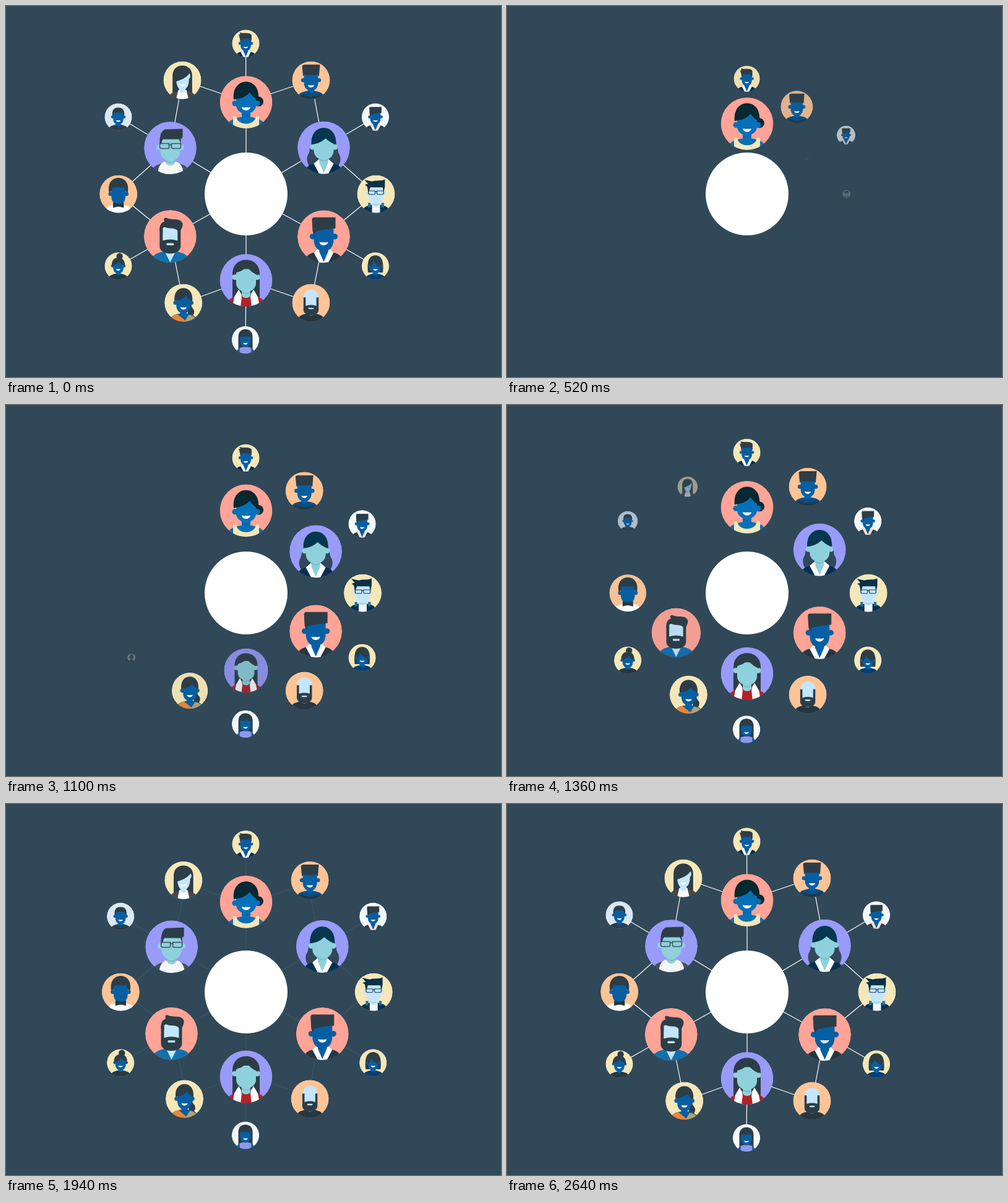
An HTML page that plays this animation: 800x600 px, repeating every 5.02 s.

```html
<!DOCTYPE html>
<html lang="en">
<head>
<meta charset="utf-8">
<title>Community network</title>
<style>
html, body { margin: 0; width: 100%; height: 100%; overflow: hidden; background: #314858; }
svg { display: block; width: 100vw; height: 100vh; }
</style>
</head>
<body>
<svg id="stage" viewBox="0 0 800 600">
  <defs><clipPath id="disc"><circle r="42.5"/></clipPath></defs>
  <g id="links" stroke="#fff" stroke-width="1.2"></g>
  <g id="people"></g>
  <circle cx="388" cy="304" r="67" fill="#fff"/>
</svg>
<script>
const LOOP = 5020, STEP = 20, POP = 300, CX = 388, CY = 304;
const RED = '#ffa496', VIOLET = '#989bf8', ORANGE = '#ffc496', CREAM = '#f5e7b8',
      WHITE = '#f3f8fb', PALE = '#dbe8f3';
const BLUE = '#0670b8', DEEP = '#075fa3', TEAL = '#8ed1dc', LIGHT = '#c4e6fd',
      HAIR = '#2d3d47', NAVY = '#062f50', INK = '#263741';

// Portrait parts, drawn in a disc of radius 42.5 around 0,0
const p = (fill, d) => `<path fill="${fill}" d="${d}"/>`;
const dot = (fill, x, y, r) => `<circle fill="${fill}" cx="${x}" cy="${y}" r="${r}"/>`;
const body = fill => p(fill, 'M-30 43C-30 29 -22 27 -8 24H8C22 27 30 29 30 43Z');
const neck = fill => p(fill, 'M-7 12H7V24C6 30 -6 30 -7 24Z');
const ears = (fill, y = 0) => dot(fill, -18, y, 4.6) + dot(fill, 18, y, 4.6);
const face = (fill, chin = 24) =>
  p(fill, `M-16 -18H16V5C16 ${chin - 6} 8 ${chin} 0 ${chin}S-16 ${chin - 6} -16 5Z`);
const smile = (y = 9) => p('#fff', `M-7 ${y}Q0 ${y + 1} 7 ${y}C6 ${y + 7} -6 ${y + 7} -7 ${y}Z`);
const head = (skin, chin, y) => neck(skin) + ears(skin, y) + face(skin, chin);
const shade = (skin, y = 21) => p(skin, `M-7 ${y}Q0 ${y + 5} 7 ${y}V${y + 2}Q0 ${y + 7} -7 ${y + 2}Z`);
const collar = (skin, shirt = '#fff') =>
  p(shirt, 'M-16 26L-8 19H8L16 26L7 43H-7Z') + p(skin, 'M-7 18H7V25L0 41L-7 25Z');
const flatTop = fill => p(fill, 'M-18 -9L-19 -27Q-19 -31 -15 -31H19V-13C8 -12 -4 -11 -12 -8L-16 -2Z');
const glasses = c => `<path fill="none" stroke="${c}" stroke-width="1.6"
  d="M-17 -7H-2V-1Q-2 1 -4 1H-14Q-17 1 -17 -2ZM2 -7H17V-2Q17 1 14 1H4Q2 1 2 -1ZM-2 -5H2"/>`;
const beard = p(HAIR, 'M-17 -12H-12V7Q0 3 12 7V-12H17V16C17 32 -17 32 -17 16Z')
  + `<rect x="-6" y="11" width="12" height="3.4" rx="1.5" fill="${LIGHT}"/>`;
const crown = fill => p(fill, 'M-20 -4C-22 -23 -12 -33 0 -33S22 -23 20 -4C12 -7 8 -12 6 -16C0 -9 -8 -6 -16 -5Z');
const longHair = fill => p(fill, 'M-22 42V-10C-22 -25 -12 -33 0 -33S22 -25 22 -10V42Z');

const big = [
  [388, 155.5, RED, 233, body(BLUE) + p(CREAM, 'M-21 43V23H-16C-14 39 14 39 16 23H21V43Z')
    + dot('#082832', 20, -1, 8) + head(BLUE, 19, 2) + shade('#0766a8', 18) + smile(8) + crown('#082832')],
  [513.5, 229, VIOLET, 507, p('#33475a', 'M-18 -8C-25 -1 -21 5 -25 11S-27 29 -19 34L-8 30V-8ZM18 -8C25 -1 21 5 25 11S27 29 19 34L8 30V-8Z')
    + body(NAVY) + collar(TEAL) + head(TEAL, 20, -1) + shade('#77bccb', 18)
    + p('#05384f', 'M-20 -5C-21 -23 -11 -32 0 -32S21 -23 20 -5C15 -6 8 -10 3 -15C-2 -10 -9 -6 -20 -5Z')],
  [513.5, 372.8, RED, 652, body(INK) + collar(DEEP) + head(DEEP) + smile() + flatTop(HAIR)],
  [388, 443.5, VIOLET, 920, longHair(HAIR) + body('#b42129')
    + p('#fff', 'M-12 15L-19 27L-22 43H-5L-8 22ZM12 15L19 27L22 43H5L8 22Z')
    + p('#b42129', 'M-7 27L0 31L7 27L9 43H-9Z') + head(TEAL, 19, -5) + shade('#77bccb', 18)
    + p(HAIR, 'M-19 -8C-19 -26 -8 -30 0 -29S19 -26 19 -8C13 -11 5 -15 1 -24C-3 -15 -12 -14 -16 -12Z')],
  [265.3, 372.5, RED, 1135, body('#1470ad') + p(LIGHT, 'M-9 24H9L0 42Z') + face(LIGHT, 20) + beard
    + p(HAIR, 'M-17 -8C-18 -19 -13 -23 -9 -24C-11 -27 -10 -30 -7 -30C4 -25 16 -31 20 -21C21 -16 18 -12 16 -8H13C10 -12 6 -13 0 -13C-6 -13 -10 -17 -12 -13V-6Z')],
  [265.5, 229.5, VIOLET, 1366, body('#43515d') + p('#f4f8fb', 'M-20 43C-20 31 -16 25 -9 22C-4 28 4 28 9 22C17 25 21 31 21 43Z')
    + head(TEAL, 21, -1) + shade('#77bccb', 20)
    + p(HAIR, 'M-17 -5C-18 -20 -14 -29 -8 -30L20 -31V-19Q20 -15 17 -15V-7L14 -14H-11Q-14 -13 -14 -7Z') + glasses('#43515d')]
];

const mid = [
  [493, 120, ORANGE, 335, body('#064f87') + p(INK, 'M-32 43C-29 32 -20 31 -12 34Q0 40 12 34C20 31 29 32 32 43Z')
    + head(DEEP) + smile(11) + p(HAIR, 'M-18 -9L-20 -31Q-20 -34 -15 -35H20L18 -9L14 -13C7 -11 -7 -11 -14 -13Z')],
  [598, 304, CREAM, 485, body(NAVY) + p(WHITE, 'M-9 24H9V43H-9Z') + p('#1673ad', 'M-18 20H-12V30H-18ZM12 20H18V30H12Z')
    + head(LIGHT, 23, -1) + shade('#8fcbea')
    + p('#0a3147', 'M-17 -2L-20 -17L-25 -21L-18 -23L-26 -32L-9 -28C0 -32 12 -28 20 -33V-17L17 -2L15 -15H-13Z') + glasses('#173c52')],
  [493, 480, ORANGE, 785, body(INK) + neck(LIGHT) + p(LIGHT, 'M-17 10V-10C-17 -23 -9 -29 0 -29S17 -23 17 -10V10Z') + beard],
  [286.7, 480, CREAM, 863, p(HAIR, 'M8 -18C27 -8 14 5 20 11S26 24 18 32L10 28Z') + body(DEEP)
    + p('#ed8535', 'M-32 43C-29 31 -22 28 -14 25L8 43Z') + p('#b7a06b', 'M2 43L12 27C23 29 29 33 31 43Z')
    + head(DEEP) + smile(10) + crown(HAIR)],
  [181.7, 304, ORANGE, 1105, body('#fff') + head(DEEP) + p(HAIR, 'M-21 -3C-25 -24 -14 -36 0 -36S25 -24 21 -3L16 -6L13 -15H-13L-16 -6Z')
    + p(INK, 'M-12 19L0 22L12 19V31L0 28L-12 31Z')],
  [285, 120, CREAM, 1265, longHair(HAIR) + body('#4a4744') + p('#fff', 'M-9 22H9L14 43H-14Z')
    + neck(LIGHT) + p(LIGHT, 'M-14 1C-2 -1 9 -7 13 -17C18 -16 20 -7 15 -3C15 13 9 22 0 22S-12 14 -14 1Z')
    + smile(9) + p(HAIR, 'M-21 13V-12C-17 -32 9 -36 17 -17C9 -4 -5 0 -14 3Z')]
];

const small = [
  [387.5, 60.5, CREAM, 285, body(NAVY) + collar(DEEP) + head(DEEP) + smile(10)
    + p(HAIR, 'M-17 -4L-18 -14L-22 -28L-17 -27L-19 -34C-5 -29 11 -36 18 -26V-10L15 -4L13 -14H-12Z')],
  [597, 179.5, WHITE, 390, body(HAIR) + collar(DEEP, '#f6dfd8') + head(DEEP) + smile(10) + flatTop(HAIR)],
  [597, 420.5, CREAM, 652, p(HAIR, 'M-23 20C-27 -15 -19 -33 0 -33S27 -15 23 20Z') + body('#074071')
    + head(DEEP) + smile(9) + p(HAIR, 'M-17 2C-19 -20 -8 -29 2 -28S19 -15 17 5C8 1 0 -5 -5 -13L-14 3Z')],
  [387, 540, WHITE, 796, longHair(HAIR) + p(DEEP, 'M-27 43C-28 28 -18 24 -8 23H8C18 24 28 28 27 43Z')
    + p('#9097ee', 'M-18 43V25L-8 22H8L18 25V43Z') + face(DEEP, 22) + smile(9)
    + p(HAIR, 'M-18 -10C-18 -26 -8 -30 0 -30S18 -26 18 -10Z')],
  [181.5, 420.5, CREAM, 1051, dot(HAIR, 4, -30, 10) + body(INK) + head(DEEP) + smile(9)
    + p(HAIR, 'M-20 0C-22 -18 -12 -26 0 -26S22 -18 20 0C12 -4 6 -9 3 -14C-3 -6 -10 -3 -20 0Z')],
  [181.5, 179.5, PALE, 1215, body(HAIR) + p('#064f87', 'M-10 23H10L0 37Z') + head(DEEP) + smile(10)
    + p(HAIR, 'M-18 -3C-21 -21 -13 -29 0 -29S21 -21 18 -3L15 -5L13 -14H-13L-15 -5Z')]
];

const people = [[small, 22.2], [mid, 30.6], [big, 42.5]].flatMap(([ring, r]) =>
  ring.map(([x, y, bg, start, art]) => ({ x, y, bg, start, art, size: r / 42.5 })));

const crowd = document.getElementById('people'), links = document.getElementById('links');
crowd.innerHTML = people.map(o =>
  `<g><g clip-path="url(#disc)"><circle r="42.5" fill="${o.bg}"/>${o.art}</g></g>`).join('');
people.forEach((o, i) => o.node = crowd.children[i]);

const line = (a, b) => `<line x1="${a[0]}" y1="${a[1]}" x2="${b[0]}" y2="${b[1]}"/>`;
links.innerHTML = big.map((b, i) => line([CX, CY], b) + line(b, small[i])
  + line(b, mid[i]) + line(mid[i], big[(i + 1) % 6])).join('');

const clamp = v => Math.max(0, Math.min(1, v));
const easeOut = v => 1 - (1 - clamp(v)) ** 2;

// How far the network still is from its full spread
function shrink(t) {
  if (t < 100 || t >= 2640) return 0;
  const early = 0.016 * clamp((740 - t) / 480);
  return ((3030 - t) * 2.43e-4 + early) ** 3 - 0.0008;
}

function draw(t) {
  const leaving = t < 100, gap = shrink(t), spread = 1 - gap;
  const fade = t < 40 ? 1 : clamp(1 - (t - 20) / 80);
  for (const o of people) {
    const pop = leaving ? 1 : easeOut((t - o.start) / POP);
    const x = CX + (o.x - CX) * spread, y = CY + (o.y - CY) * spread;
    o.node.setAttribute('transform', `translate(${x} ${y}) scale(${o.size * pop})`);
    o.node.setAttribute('opacity', leaving ? fade : pop);
  }
  const reach = 1 - 2.5 * gap;
  links.setAttribute('transform', `translate(${CX} ${CY}) scale(${reach}) translate(${-CX} ${-CY})`);
  links.setAttribute('opacity', leaving ? fade : clamp((t - 1900) / 600));
}

const origin = performance.now();
function tick() {
  const t = (performance.now() - origin) % LOOP;
  draw(Math.floor(t / STEP) * STEP);
  requestAnimationFrame(tick);
}
draw(0);
requestAnimationFrame(tick);
</script>
</body>
</html>
```
